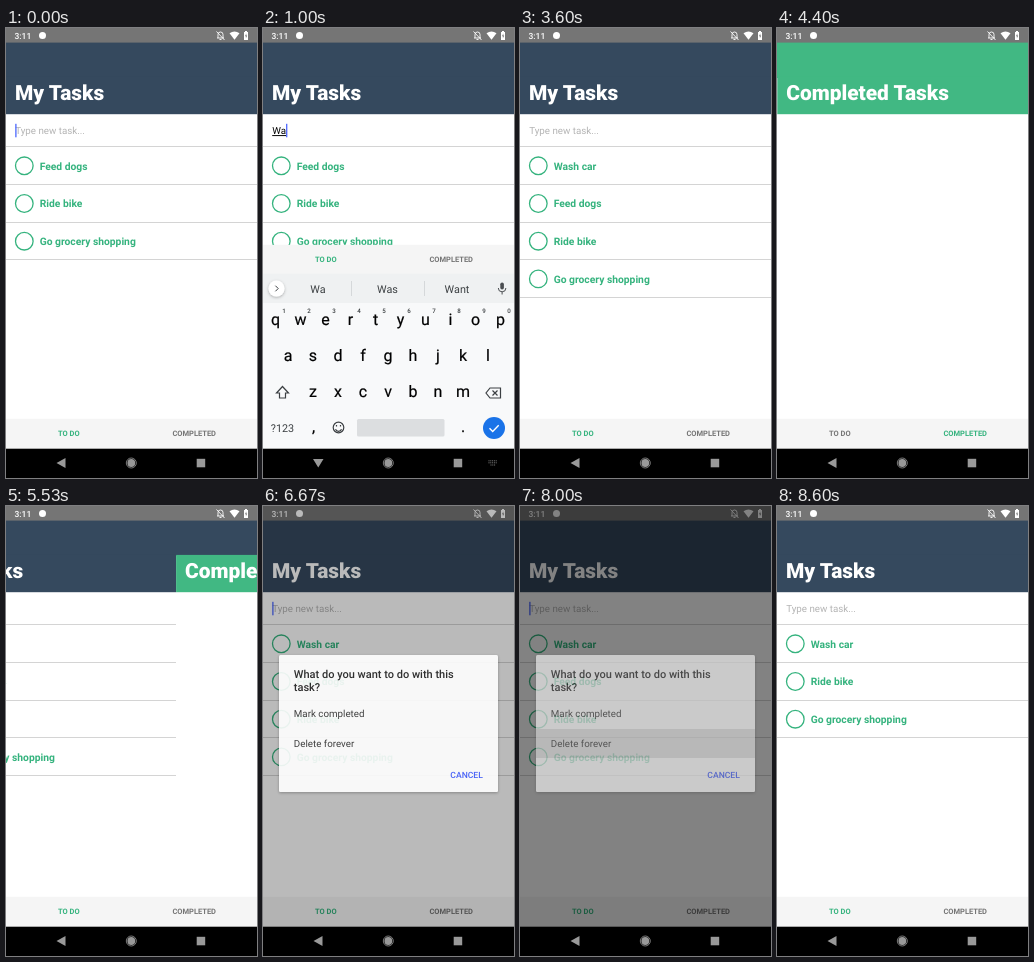
Recreate the animation shown at these times as an HTML page. Size 251x450 px, loop 8940 ms.

```html
<!DOCTYPE html>
<html lang="en">
<head>
<meta charset="utf-8">
<title>My Tasks</title>
<style>
html, body { margin: 0; width: 100%; height: 100%; overflow: hidden; background: #fff; }
svg { display: block; width: 251px; height: 450px; font-family: Roboto, "Noto Sans", sans-serif; text-rendering: geometricPrecision; }
.title { font-size: 20.9px; font-weight: 900; fill: #fff; }
.body { font-size: 9.77px; }
.task { font-size: 10.3px; font-weight: 700; fill: #35b37e; }
.line { stroke: #d4d4d4; shape-rendering: crispEdges; }
.tab { font-size: 7.5px; font-weight: 700; fill: #757575; }
.tab.active { fill: #35b37e; }
.mid { text-anchor: middle; }
.key { font-size: 16px; fill: #000; stroke: #000; stroke-width: .2; }
.hint { font-size: 6.2px; font-weight: 500; fill: #3c4043; }
.small { font-size: 10.8px; fill: #3c4043; }
.caps .key { text-transform: uppercase; }
.caps #shift { fill: #3c4043; }
#typed { white-space: pre; }
#typed tspan + tspan { text-decoration: underline; }

#pages, #tabs, #keyboard, #dim, #dialog, #ripple { animation: 8.94s linear infinite; }
#pages { animation-name: pages; }
#tabs { animation-name: tabs; animation-timing-function: step-end; }
#keyboard { animation-name: keyboard; }
#dim { animation-name: dim; }
#dialog { animation-name: dialog; }
#ripple { animation-name: ripple; }

@keyframes pages {
  0%, 63.68%, 100% { transform: none; }
  47.37% { transform: none; animation-timing-function: cubic-bezier(.22, 1, .36, 1); }
  49.61% { transform: translateX(-251px); }
  61.41% { transform: translateX(-251px); animation-timing-function: cubic-bezier(.22, 1, .36, 1); }
}
@keyframes tabs {
  0%, 34.34%, 100% { transform: none; }
  3.02% { transform: translateY(-174px); }
}
@keyframes keyboard {
  0%, 36.5%, 100% { transform: translateY(176px); }
  .7% { transform: translateY(176px); animation-timing-function: ease-out; }
  3.6% { transform: none; }
  34%  { transform: none; animation-timing-function: ease-in; }
}
@keyframes dim {
  0%, 73.71%, 91.7%, 100% { opacity: 0; }
  75.73%, 89% { opacity: .6; }
}
@keyframes dialog {
  0%, 73.71%, 90.6%, 100% { opacity: 0; }
  74.72%, 88.7% { opacity: 1; }
}
@keyframes ripple {
  0%, 87.8% { transform: scale(0); }
  88.03% { transform: scale(82); }
  88.7%, 100% { transform: scale(125); }
}
</style>
</head>
<body>
<svg viewBox="0 0 251 450">
  <defs>
    <clipPath id="stage"><rect width="251" height="420.7"/></clipPath>
    <clipPath id="item"><rect x="16" y="223" width="219" height="28.5"/></clipPath>
    <filter id="shadow" x="-20%" y="-20%" width="140%" height="140%">
      <feDropShadow dx="0" dy="1" stdDeviation="1.6" flood-opacity=".3"/>
    </filter>
  </defs>
  <rect width="251" height="450" fill="#fff"/>
  <rect id="strip" y="14" width="251" height="36"/>

  <g id="pages">
    <rect y="48.9" width="251" height="37.3" fill="#35495e"/>
    <text class="title" x="9" y="71.5">My Tasks</text>
    <text id="placeholder" class="body" x="9.2" y="106.1" fill="#b4b4b4">Type new task...</text>
    <text id="typed" class="body" x="9.2" y="106.1" fill="#000"><tspan></tspan><tspan></tspan></text>
    <rect id="cursor" y="95.8" width="1.2" height="13.5" fill="#3d5afe"/>
    <path class="line" d="M0 118.5H251"/>
    <g id="rows"></g>
    <g transform="translate(251)">
      <rect y="48.9" width="251" height="37.3" fill="#41b883"/>
      <text class="title" x="9" y="71.5">Completed Tasks</text>
    </g>
  </g>

  <g id="tabs">
    <rect y="390.8" width="251" height="30.2" fill="#f5f5f5"/>
    <text id="todo" class="tab mid" x="62.8" y="408.3">TO DO</text>
    <text id="done" class="tab mid" x="188.2" y="408.3">COMPLETED</text>
  </g>

  <g clip-path="url(#stage)">
    <g id="keyboard">
      <rect y="245.5" width="251" height="176" fill="#f8f9fa"/>
      <rect y="245.5" width="251" height="29.5" fill="#eff1f2"/>
      <circle cx="13.5" cy="260.5" r="8" fill="#fff" filter="url(#shadow)"/>
      <path d="M12.4 257.7l2.8 2.8-2.8 2.8" fill="none" stroke="#3c4043"/>
      <g id="words"></g>
      <path id="bars" d="M88.5 253v15M161.5 253v15" stroke="#cfd2d4" stroke-width=".8"/>
      <rect x="237.3" y="254.5" width="3.6" height="7" rx="1.8" fill="#4a4d51"/>
      <path d="M235.3 260a3.8 3.8 0 0 0 7.6 0M239.1 264v2.5" fill="none" stroke="#4a4d51"/>
      <g id="keys"></g>
      <g fill="none" stroke="#3c4043" stroke-width="1.2">
        <path id="shift" d="M19.5 358.5l6 6.5h-3v5h-6v-5h-3z"/>
        <path d="M227 360h10.500v10H227l-4-5zM229.500 362.500l5 5M234.500 362.500l-5 5"/>
        <circle cx="75.5" cy="399.5" r="5.3"/>
        <path d="M72.5 401.200a3.200 3.200 0 0 0 6 0M73.500 397v1.500M77.500 397v1.500"/>
      </g>
      <text class="small mid" x="19.500" y="403.500" fill="#000">?123</text>
      <text class="key mid" x="50.500" y="404">,</text>
      <text class="key mid" x="200" y="404">.</text>
      <rect x="94" y="391" width="87.500" height="17.500" rx="1.500" fill="#dcdee0"/>
      <circle cx="231" cy="400" r="11" fill="#1a73e8"/>
      <path d="M226.500 400.200l3.200 3.200 6-6.200" fill="none" stroke="#fff" stroke-width="1.400"/>
      <g id="popup">
        <rect x="-12.500" y="-58" width="25" height="73" rx="2" fill="#f0f1f2" filter="url(#shadow)"/>
        <text class="key mid" x=".8" y="-34"></text>
        <text class="hint mid" x="8" y="-27">...</text>
      </g>
    </g>
  </g>

  <g fill="#fff">
    <rect width="251" height="14.600" fill="#757575"/>
    <text x="8.500" y="10.800" font-size="8.500" font-weight="500">3:11</text>
    <circle cx="36.500" cy="7.500" r="3.500"/>
    <path d="M211 10h7M212 10V6.500a2.500 2.500 0 0 1 5 0V10M210.500 3.500l8 8.500M213.500 11.500h2" fill="none" stroke="#fff" stroke-width=".9"/>
    <path d="M223.500 5.300q5-3.800 10 0l-5 6.500z"/>
    <path d="M238 4h1V3h2v1h1v8h-4z"/>
    <path d="M240.300 5.500l-1.300 2.700h.9v2l1.300-2.700h-.9z" fill="#757575"/>
  </g>
  <rect id="dim" width="251" height="421"/>

  <g id="dialog">
    <rect x="16" y="149" width="219" height="137" rx="1.500" fill="#fff" filter="url(#shadow)"/>
    <g clip-path="url(#item)"><g transform="translate(125.500 237.300)"><circle id="ripple" r="1" fill="#e0e0e0"/></g></g>
    <g font-size="11" font-weight="500" fill="#212121">
      <text x="30.800" y="171.700">What do you want to do with this</text>
      <text x="30.800" y="184.700">task?</text>
    </g>
    <g class="body" fill="#333">
      <text x="30.800" y="211.300">Mark completed</text>
      <text x="30.800" y="240.800">Delete forever</text>
    </g>
    <text x="187.300" y="272.200" font-size="8.600" font-weight="500" fill="#3d5afe">CANCEL</text>
  </g>

  <rect y="420.700" width="251" height="29.300"/>
  <g fill="#999">
    <path id="back"/>
    <circle cx="125.300" cy="435" r="3.900"/>
    <circle cx="125.300" cy="435" r="5" fill="none" stroke="#999" stroke-width=".8"/>
    <rect x="190.700" y="430.800" width="8.500" height="8.500"/>
    <path id="switcher" d="M225.500 432.800h9M225.500 434.800h9M227.500 437h5" stroke="#808080" stroke-dasharray="1 .8"/>
  </g>
</svg>
<script>
const LOOP = 8940;
const $ = id => document.getElementById(id);
const show = (el, on) => el.style.display = on ? '' : 'none';
const between = (t, a, b) => t >= a && t < b;

// [time, field text, pressed key]
const typing = [
  [0, '', ''], [670, '', 'w'], [800, 'W', ''], [870, 'W', 'a'], [1000, 'Wa', ''],
  [1200, 'Wa', 's'], [1270, 'Was', ''], [1400, 'Was', 'h'], [1470, 'Wash', ''],
  [1730, 'Wash ', ''], [2070, 'Wash ', 'c'], [2130, 'Wash c', ''],
  [2195, 'Wash c', 'a'], [2265, 'Wash ca', ''], [2330, 'Wash ca', 'r'],
  [2400, 'Wash car', ''], [3070, '', '']
];
const suggestions = {
  'W': 'W We What', 'Wa': 'Wa Was Want', 'Was': 'Was Wash Wasn\'t',
  'Wash': 'Washed Wash Washing', 'Wash ': 'the and your', 'Wash c': 'c clothes cloth',
  'Wash ca': 'ca car can', 'Wash car': 'cat car care'
};
const cursorOff = [[530, 670], [2930, 3070], [3600, 4130], [6000, 6530], [8530, LOOP]];

const places = {};
['qwertyuiop', 'asdfghjkl', 'zxcvbnm'].forEach((row, r) => {
  [...row].forEach((char, i) => {
    const x = [12.5, 25, 50][r] + i * 25, y = 292 + r * 36;
    places[char] = [x, y];
    $('keys').innerHTML += `<text class="key mid" x="${x}" y="${y + 5.2}">${char}</text>` +
      (r ? '' : `<text class="hint mid" x="${x + 8.5}" y="285">${(i + 1) % 10}</text>`);
  });
});
$('words').innerHTML = [55, 124.5, 194]
  .map(x => `<text class="small mid" x="${x}" y="264.5"></text>`).join('');
const words = $('words').children;

function drawTasks(t) {
  const tasks = ['Feed dogs', 'Ride bike', 'Go grocery shopping'];
  if (t >= 3070) tasks.unshift('Wash car');
  if (t >= 8060) tasks.splice(1, 1);
  const key = tasks.join();
  if ($('rows').dataset.key === key) return;
  $('rows').dataset.key = key;
  $('rows').innerHTML = tasks.map((name, i) => `
    <g transform="translate(0 ${i * 37.7})">
      <circle cx="18.3" cy="137.8" r="8.8" fill="none" stroke="#35b37e" stroke-width="1.3"/>
      <text class="task" x="33.7" y="141.8">${name}</text>
      <path class="line" d="M0 156.4H251"/>
    </g>`).join('');
}

function drawTyping(t) {
  const [, text, key] = typing.findLast(step => t >= step[0]);
  const split = text.lastIndexOf(' ') + 1;
  const [plain, composing] = $('typed').children;
  plain.textContent = text.slice(0, split);
  composing.textContent = text.slice(split);
  show($('placeholder'), !text);
  const width = text ? $('typed').getComputedTextLength() : 0;
  $('cursor').setAttribute('x', 9.3 + width);
  show($('cursor'), !cursorOff.some(([a, b]) => between(t, a, b)));

  const choices = (suggestions[text] || '').split(' ');
  [...words].forEach((word, i) => word.textContent = choices[i] || '');
  show($('bars'), choices.length > 1);
  $('keyboard').classList.toggle('caps', t < 800);
  show($('popup'), key);
  if (key) {
    $('popup').setAttribute('transform', `translate(${places[key]})`);
    $('popup').querySelector('.key').textContent = key;
  }
}

function draw(t) {
  drawTasks(t);
  drawTyping(t);
  const completed = between(t, 4235, 5490);
  $('strip').setAttribute('fill', completed ? '#41b883' : '#35495e');
  $('todo').classList.toggle('active', !completed);
  $('done').classList.toggle('active', completed);
  const open = between(t, 130, 3130);
  $('back').setAttribute('d', open ? 'M50 431h10.5l-5.25 8.5z' : 'M50.5 435l9-5v10z');
  show($('switcher'), open);
}

let start;
function tick(now) {
  start ??= now;
  draw((now - start) % LOOP);
  requestAnimationFrame(tick);
}
draw(0);
requestAnimationFrame(tick);
</script>
</body>
</html>
```
